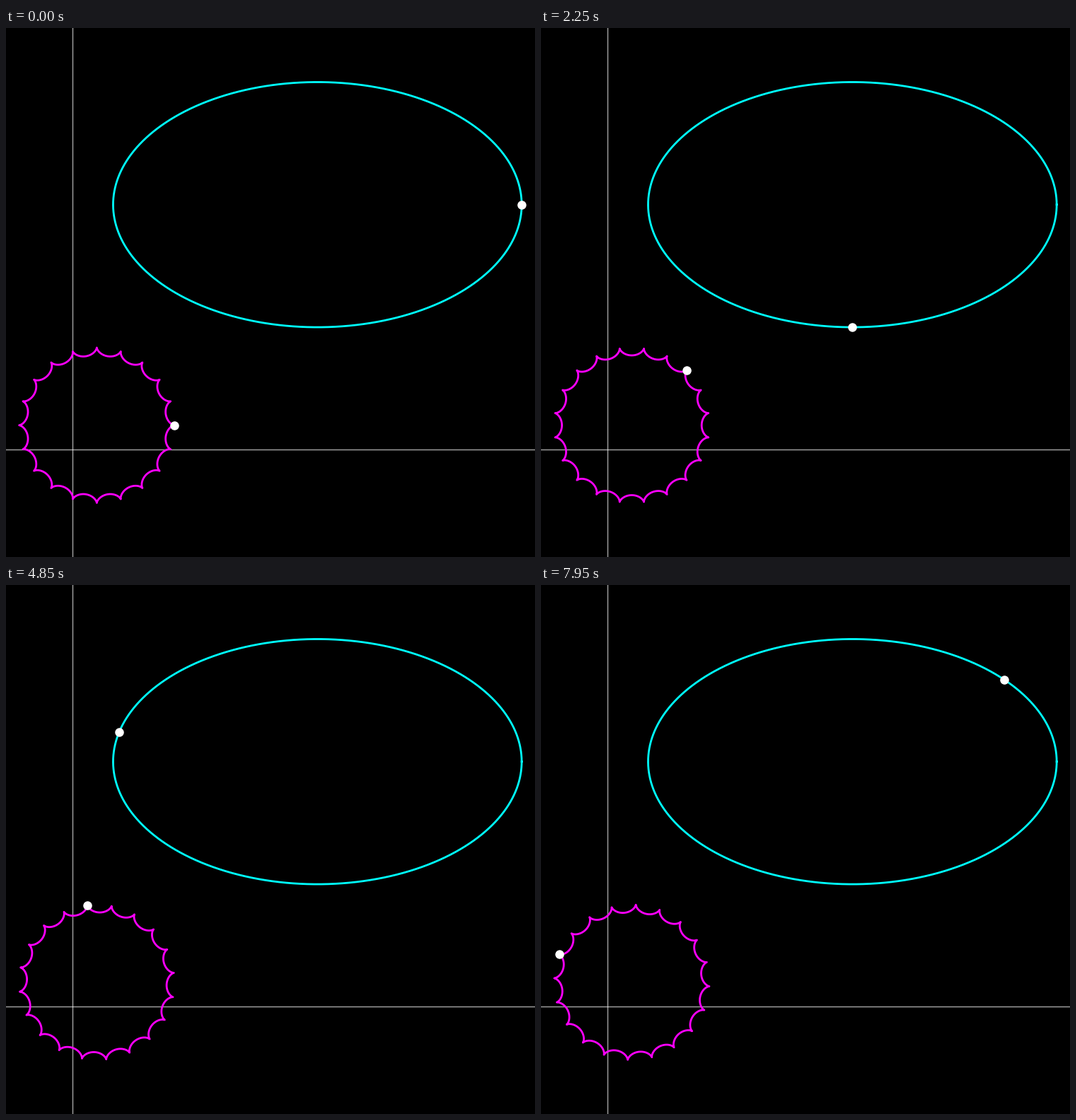
A matplotlib script that plays this animation: 748 px wide and 748 px high, repeating every 8 s.

```python
import numpy as np
import matplotlib.pyplot as plt
from matplotlib.animation import FuncAnimation

SIZE, DPI = 748, 100
UNIT = 57.77                 # pixels per unit
X0, Y0 = 93.7, 596.4         # axes crossing, pixels from top left
FRAMES, INTERVAL = 160, 50
PERIOD = 9000                # ms for one trip around the ellipse

GEAR_C, GEAR_R, CUSPS = 0.6, 1.9, 20
ELL_C, ELL_A, ELL_B = 6, 5, 3

fig = plt.figure(figsize=(SIZE / DPI, SIZE / DPI), dpi=DPI, facecolor="black")
ax = fig.add_axes([0, 0, 1, 1])
ax.axis("off")
ax.set_xlim(-X0 / UNIT, (SIZE - X0) / UNIT)
ax.set_ylim((Y0 - SIZE) / UNIT, Y0 / UNIT)

ax.axhline(0, color="white", alpha=0.65, lw=1, zorder=1)
ax.axvline(0, color="white", alpha=0.65, lw=1, zorder=1)

t = np.linspace(0, 2 * np.pi, 2001)
ax.plot(ELL_C + ELL_A * np.cos(t), ELL_C + ELL_B * np.sin(t),
        color="cyan", lw=2, zorder=2)

# Hypocycloid as a complex curve, rotated about its own centre.
r = GEAR_R / CUSPS
hypo = (GEAR_R - r) * np.exp(1j * t) + r * np.exp(-1j * (CUSPS - 1) * t)
center = GEAR_C * (1 + 1j)

gear, = ax.plot([], [], color="magenta", lw=2, zorder=3)
dots, = ax.plot([], [], "o", color="white", ms=8, zorder=4)


def update(i):
    angle = 2 * np.pi * i * INTERVAL / PERIOD
    spin = np.exp(0.5j * angle)
    curve = center + hypo * spin
    tip = center + GEAR_R * spin
    gear.set_data(curve.real, curve.imag)
    dots.set_data([tip.real, ELL_C + ELL_A * np.cos(angle)],
                  [tip.imag, ELL_C - ELL_B * np.sin(angle)])
    return gear, dots


anim = FuncAnimation(fig, update, frames=FRAMES, interval=INTERVAL,
                     repeat=True, repeat_delay=0, blit=False)
plt.show()
```
